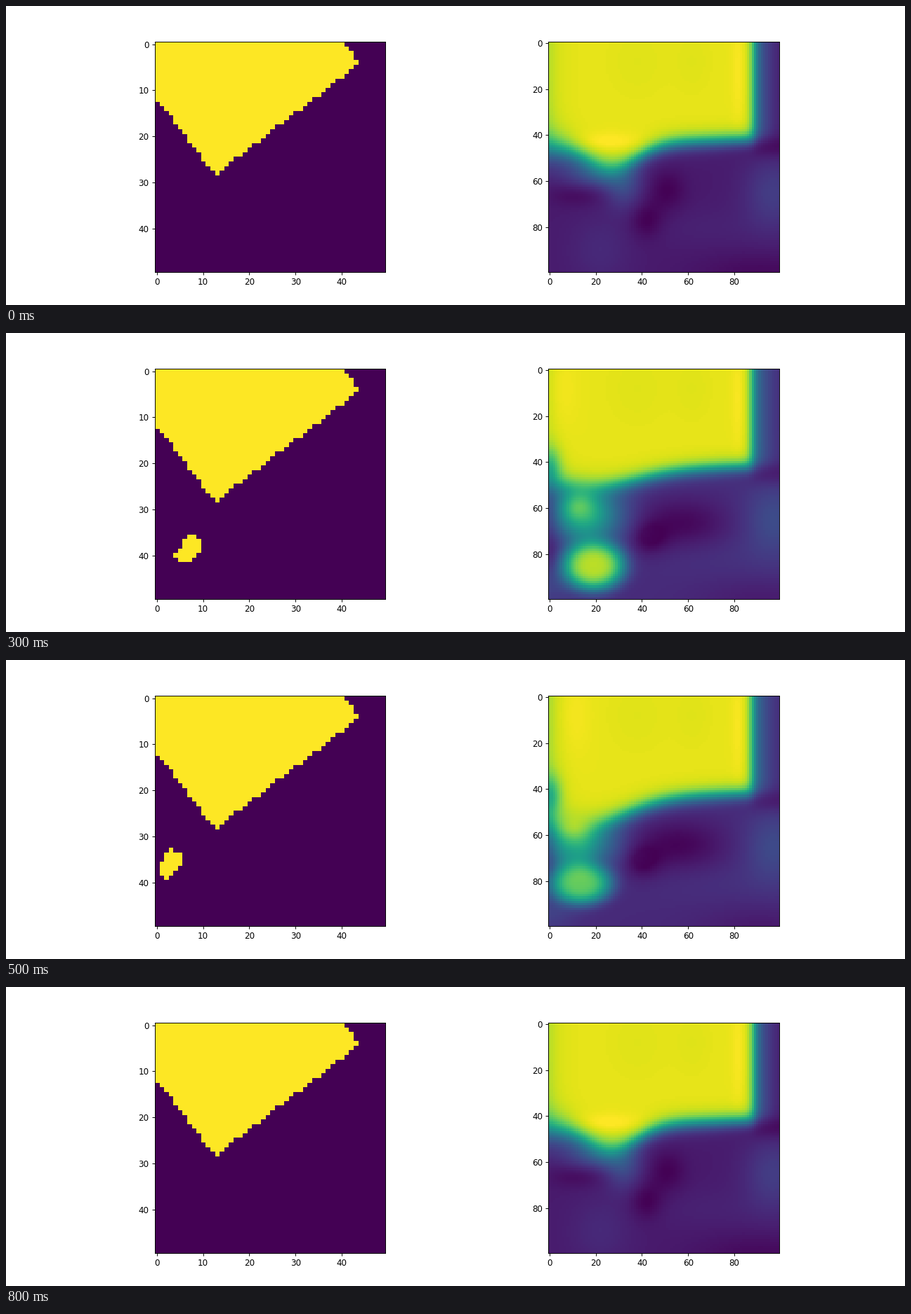
A matplotlib script that plays this animation: 1280x427 px, repeating every 900 ms.

```python
import numpy as np
import matplotlib.pyplot as plt
from matplotlib.animation import FuncAnimation

FRAMES = 9
DPI = 64
K = 4 / 3  # default sizes scaled to this dpi
plt.rcParams.update({
    "font.family": "DejaVu Sans",
    "font.size": 10 * K,
    "axes.linewidth": 0.8 * K,
    "xtick.major.size": 3.5 * K, "ytick.major.size": 3.5 * K,
    "xtick.major.width": 0.8 * K, "ytick.major.width": 0.8 * K,
    "xtick.major.pad": 3.5 * K, "ytick.major.pad": 3.5 * K,
})


def is_empty(n):
    """The small body is out of view at both ends of the loop."""
    return n % (FRAMES - 1) == 0


# --- left panel: binary occupancy grid -------------------------------------
COL, ROW = np.meshgrid(np.arange(50), np.arange(50))


def occupancy(n):
    wedge = ((COL <= 40.6 + .7 * ROW)
             & (COL <= 49.18 - 1.288 * ROW)
             & (COL >= .76 * ROW - 9.13))
    if is_empty(n):
        return wedge.astype(float)
    # tilted box drifting to the upper left
    dx = COL - (11.1 - 2.1 * (n - 1))
    dy = ROW - (41.5 - 1.37 * (n - 1))
    box = (abs(2 * dx - 3 * dy) <= 10.8) & (abs(4 * dx + 3 * dy) <= 9.5)
    return (wedge | (box & (COL > 0))).astype(float)


# --- right panel: smooth reconstruction ------------------------------------
X, Y = np.meshgrid(np.arange(100.0), np.arange(100.0))


def sigmoid(z):
    return 1 / (1 + np.exp(-z))


def bump(x, y, sx, sy, amp, power=1):
    r2 = ((X - x) / sx) ** 2 + ((Y - y) / sy) ** 2
    return amp * np.exp(-r2 ** power)


def bright_area(dip, dip_x, dip_width, soft, right):
    """Bright top region whose lower border sags around dip_x."""
    edge = 45.4 - .04 * X + dip * np.exp(-((X - dip_x) / dip_width) ** 2)
    width = 1.9 + soft * np.exp(-X / 25)
    side = (.75 * sigmoid((right - X) / 1.2)
            + .25 * sigmoid((right + 6 - X) / 2.5))
    return sigmoid((edge - Y) / width) * side


def ground(level):
    return (level + bump(97, 65, 13, 16, .11) + bump(72, 80, 30, 9, .02)
            + bump(98, 45, 18, 5, -.07) + bump(92, 100, 28, 9, -.05))


def empty_scene():
    top = bright_area(10.5, 27, 16, 2, 88.6)
    floor = (ground(.075) + bump(42, 77, 7, 8, -.08)
             + bump(51, 64, 8, 9, -.07) + bump(12, 66, 13, 5, -.05))
    glow = [bump(32, 62, 8, 10, .16), bump(20, 57, 14, 6, .15),
            bump(22, 90, 13, 15, .05)]
    return top, floor, glow, bump(25, 43, 16, 4, .05), .08


def drift_scene(s):
    """Scene with the small body, s running from 0 (entry) to 1 (exit)."""
    top = bright_area(1 + 17 * s, 25 - 18 * s, 27, .5 + 2 * s, 87.9)
    top *= 1 - bump(0, 43, 5, 9, .35)
    floor = (ground(.135 - .02 * s)
             + bump(46 - 9 * s, 75 - 5 * s, 8, 7, -.11)
             + bump(59 - 5 * s, 69 - 7 * s, 20, 11, -.11)
             + bump(0, 93, 12, 9, .08)
             + bump(1, 79, 5, 9, -.1 * (1 - s) ** 2))
    glow = [
        bump(27 - 9 * s, 63, 12, 15 - 5 * s, .26),
        bump(17 - 10 * s, 60 + 10 * s, 13 - 4 * s, 16 - 8 * s, .42, 1.3),
        bump(15 - 7 * s, 63 - 10 * s, 6 + 4 * s, 7, .35 + .5 * s),
        bump(23 - 16 * s ** 1.3, 89 - 12 * s, 13.5, 9 + 6 * (1 - s) ** 3,
             .97 - .5 * s ** 2, 1.7),
    ]
    return top, floor, glow, bump(16 * s, 8, 7, 18, .025), .15 * s


def reconstruction(n):
    scene = empty_scene() if is_empty(n) else drift_scene((n - 1) / 6)
    top, floor, glow, glint, dim = scene
    dark = (1 - top) * (1 - np.clip(floor, 0, 1))
    for layer in glow:
        dark *= 1 - layer
    rim = bump(82, 12, 3, 26, .03)
    dull = bump(38, 8, 13, 16, .012) + bump(62, 8, 8, 14, .012)
    shade = glint + rim - dull - dim * np.exp(-X / 4)
    return np.clip(.965 * (1 - dark) + shade * top, 0, 1)


# --- figure -----------------------------------------------------------------
fig, axes = plt.subplots(1, 2, figsize=(1280 / DPI, 427 / DPI), dpi=DPI)
fig.subplots_adjust(left=.1253, right=.9003, bottom=.11, top=.88, wspace=.3)
panels = (occupancy, reconstruction)
images = []
for ax, make, step in zip(axes, panels, (10, 20)):
    images.append(ax.imshow(make(0), cmap="viridis", vmin=0, vmax=1))
    ticks = np.arange(0, 5 * step, step)
    ax.set_xticks(ticks)
    ax.set_yticks(ticks)


def update(n):
    for image, make in zip(images, panels):
        image.set_data(make(n))
    return images


anim = FuncAnimation(fig, update, frames=FRAMES, interval=100,
                     repeat=True, repeat_delay=0)
plt.show()
```
